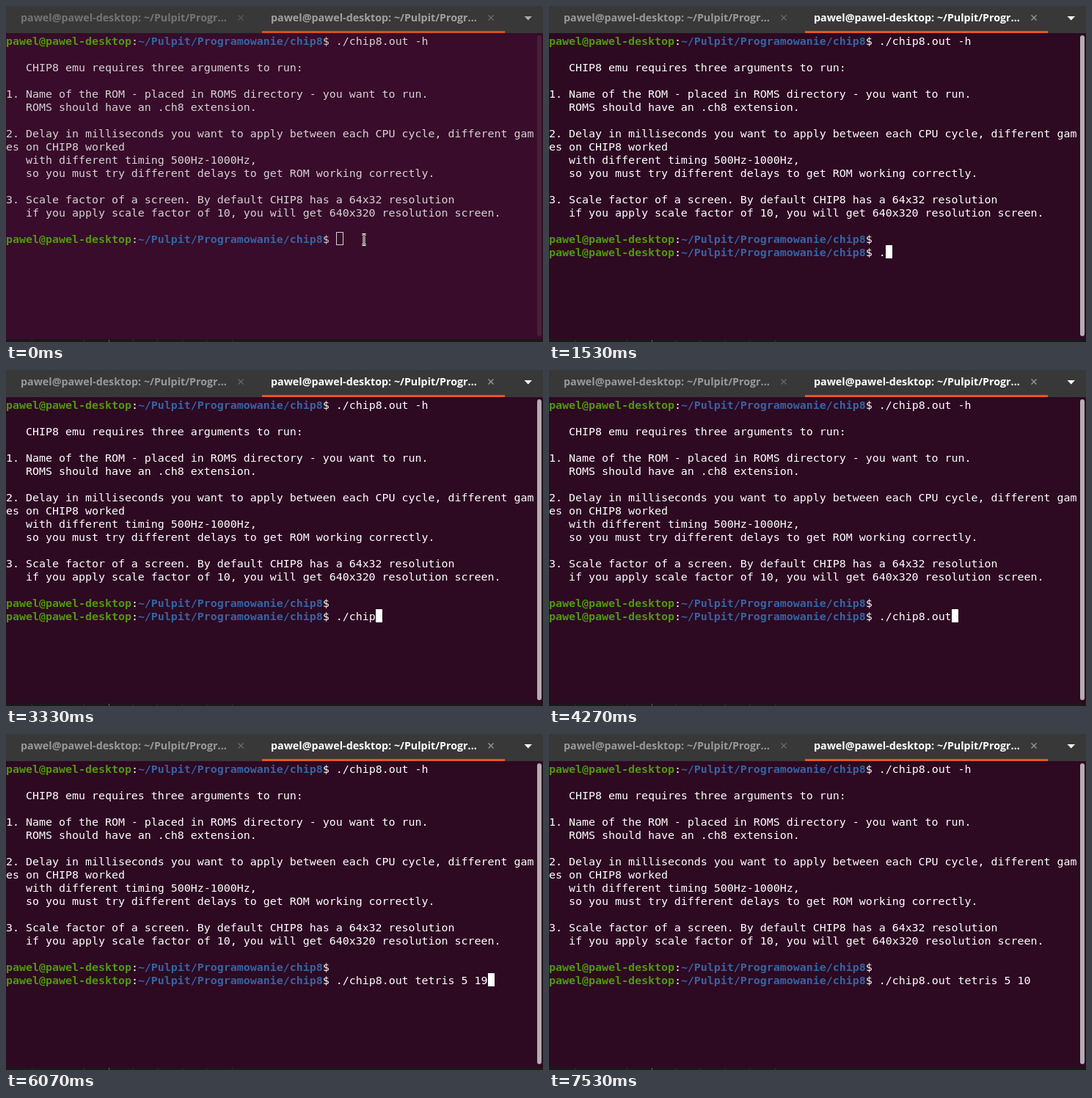
Animation, 732 px wide and 458 px high, one loop 8 s. Source, as an HTML page:

```html
<!DOCTYPE html>
<html lang="en">
<head>
<meta charset="utf-8">
<title>Terminal</title>
<style>
  html, body { margin: 0; width: 100%; height: 100%; overflow: hidden; background: #300a24; }
  svg { display: block; width: 732px; height: 458px; }
  text { white-space: pre; }
  .term { font: 14.95px "DejaVu Sans Mono", monospace; }
  .tab { font: 700 14.27px "Open Sans", "Noto Sans", sans-serif; }
  .user { fill: #4e9a06; font-weight: 700; }
  .path { fill: #3465a4; font-weight: 700; }
</style>
</head>
<body>
<svg id="stage" viewBox="0 0 732 458"></svg>
<script>
const LOOP = 8000, COL = 9, ROW = 18, TOP = 38;
const HOST = 'pawel@pawel-desktop', DIR = '~/Pulpit/Programowanie/chip8';
const PROMPT_COLS = 50;
const HELP = [
  '',
  '   CHIP8 emu requires three arguments to run:',
  '',
  '1. Name of the ROM - placed in ROMS directory - you want to run.',
  '   ROMS should have an .ch8 extension.',
  '',
  '2. Delay in milliseconds you want to apply between each CPU cycle, different gam',
  'es on CHIP8 worked',
  '   with different timing 500Hz-1000Hz,',
  '   so you must try different delays to get ROM working correctly.',
  '',
  '3. Scale factor of a screen. By default CHIP8 has a 64x32 resolution',
  '   if you apply scale factor of 10, you will get 640x320 resolution screen.'
];

// [time, characters typed]; a backspace removes the last one
const KEYS = [
  [1530, '.'], [1600, '/'], [2870, 'c'], [3000, 'h'], [3130, 'i'], [3330, 'p'],
  [3800, '8'], [3930, '.o'], [4130, 'u'], [4270, 't'], [4670, ' '], [4800, 't'],
  [4870, 'e'], [5000, 't'], [5270, 'r'], [5400, 'i'], [5670, 's'], [5730, ' 5'],
  [5870, ' '], [6000, '1'], [6070, '9'], [6470, '\b'], [6600, '0']
];
const ENTER = 1470, RUN = 6870;
const CURSOR_OFF = [[1000, ENTER], [2200, 2800], [7470, LOOP]];

// [time, x, y]; without a place the pointer is hidden
const POINTER = [
  [0, 488, 318.5], [870, 490, 317], [930, 491.5, 314.5], [1470],
  [1870, 492.5, 313.5], [2000, 493.5, 311.5], [2870],
  [7070, 493.5, 311.5], [7270, 530, 288], [7330, 594.5, 238.5],
  [7470, 590, 162.5], [7530]
];

const stage = document.getElementById('stage');

function el(tag, attrs = {}, content = '', parent = stage) {
  const node = document.createElementNS('http://www.w3.org/2000/svg', tag);
  set(node, attrs);
  node.textContent = content;
  return parent.appendChild(node);
}
function set(node, attrs) {
  for (const key in attrs) node.setAttribute(key, attrs[key]);
}
const rect = (x, y, width, height, fill, more) => el('rect', { x, y, width, height, fill, ...more });
const show = (node, on) => set(node, { visibility: on ? 'visible' : 'hidden' });

// Parts whose colour follows the window focus: [node, attribute, idle, focused]
const tinted = [];
function tint(node, attr, idle, focused) {
  tinted.push([node, attr, idle, focused]);
  return node;
}
function mix(a, b, k) {
  const part = (c, i) => parseInt(c.slice(i, i + 2), 16);
  return `rgb(${[1, 3, 5].map(i => Math.round(part(a, i) + (part(b, i) - part(a, i)) * k))})`;
}

function line(row, text = '') {
  const node = el('text', { class: 'term', x: 0, y: TOP + row * ROW + 15 }, text);
  return tint(node, 'fill', '#d6d1d4', '#ffffff');
}
function prompt(row) {
  const node = line(row);
  el('tspan', { class: 'user' }, HOST, node);
  el('tspan', {}, ':', node);
  el('tspan', { class: 'path' }, DIR, node);
  el('tspan', {}, '$ ', node);
  return { node, input: el('tspan', {}, '', node) };
}
function tab(x, idle, focused, crossIdle, crossFocused) {
  const label = el('text', { class: 'tab', x, y: 21 }, HOST + ': ~/Pulpit/Progr...');
  tint(label, 'fill', idle, focused);
  const cross = el('path', { d: `M${x + 296.5} 12.5l7 7m0-7l-7 7`, 'stroke-width': 1.3 });
  tint(cross, 'stroke', crossIdle, crossFocused);
}

tint(rect(0, 37, 732, 421), 'fill', '#380c2a', '#2d0922');
rect(0, 0, 732, 37, '#383838');
tint(rect(349, 34, 331, 3), 'fill', '#d9501f', '#e95420');
tab(20, '#747474', '#999999', '#575757', '#696969');
tab(361, '#a0a0a0', '#ffffff', '#6c6c6c', '#9a9a9a');
tint(el('path', { d: 'M706.5 14h10.5l-5.25 5.5z' }), 'fill', '#a8a8a8', '#ffffff');
tint(rect(724, 40, 6, 410, '', { rx: 3 }), 'fill', '#452338', '#b3adb1');
rect(0, 454, 732, 4, '#1b171a');
for (const x of [35, 106, 140, 173, 206, 240, 273, 308]) rect(x, 455, 1, 3, x === 140 ? '#66616a' : '#302a30');

prompt(0).input.textContent = './chip8.out -h';
HELP.forEach((text, i) => text && line(i + 1, text));
prompt(15);
const active = prompt(16);

const block = rect(0, 0, COL, ROW, '#ffffff');
const hollow = rect(450.5, 308.5, 9, 17, 'none', { stroke: '#d6d1d4' });
const pointer = el('g', { fill: 'none' });
const beam = 'M-2.5-7H-1L0-6L1-7H2.5M0-6V6M-2.5 7H-1L0 6L1 7H2.5';
el('path', { d: beam, stroke: '#ffffff', 'stroke-width': 3 }, '', pointer);
el('path', { d: beam, stroke: '#111111', 'stroke-width': 1 }, '', pointer);

function typed(t) {
  let text = '';
  for (const [at, key] of KEYS) {
    if (at <= t) text = key === '\b' ? text.slice(0, -1) : text + key;
  }
  return text;
}

function draw(t) {
  const focus = t < 400 ? 0 : t < 470 ? 0.5 : 1;
  for (const [node, attr, idle, focused] of tinted) set(node, { [attr]: mix(idle, focused, focus) });

  const text = typed(t);
  active.input.textContent = text;
  show(active.node, t >= ENTER);

  const row = t < ENTER ? 15 : t < RUN ? 16 : 17;
  const col = t < RUN ? PROMPT_COLS + text.length : 0;
  set(block, { x: col * COL, y: TOP + row * ROW });
  show(block, focus > 0 && !CURSOR_OFF.some(([from, to]) => t >= from && t < to));
  show(hollow, focus === 0);

  const [, x, y] = POINTER.filter(p => p[0] <= t).pop();
  show(pointer, x !== undefined);
  if (x !== undefined) set(pointer, { transform: `translate(${x} ${y})` });
}

function tick() {
  draw(performance.now() % LOOP);
  requestAnimationFrame(tick);
}
tick();
</script>
</body>
</html>
```
